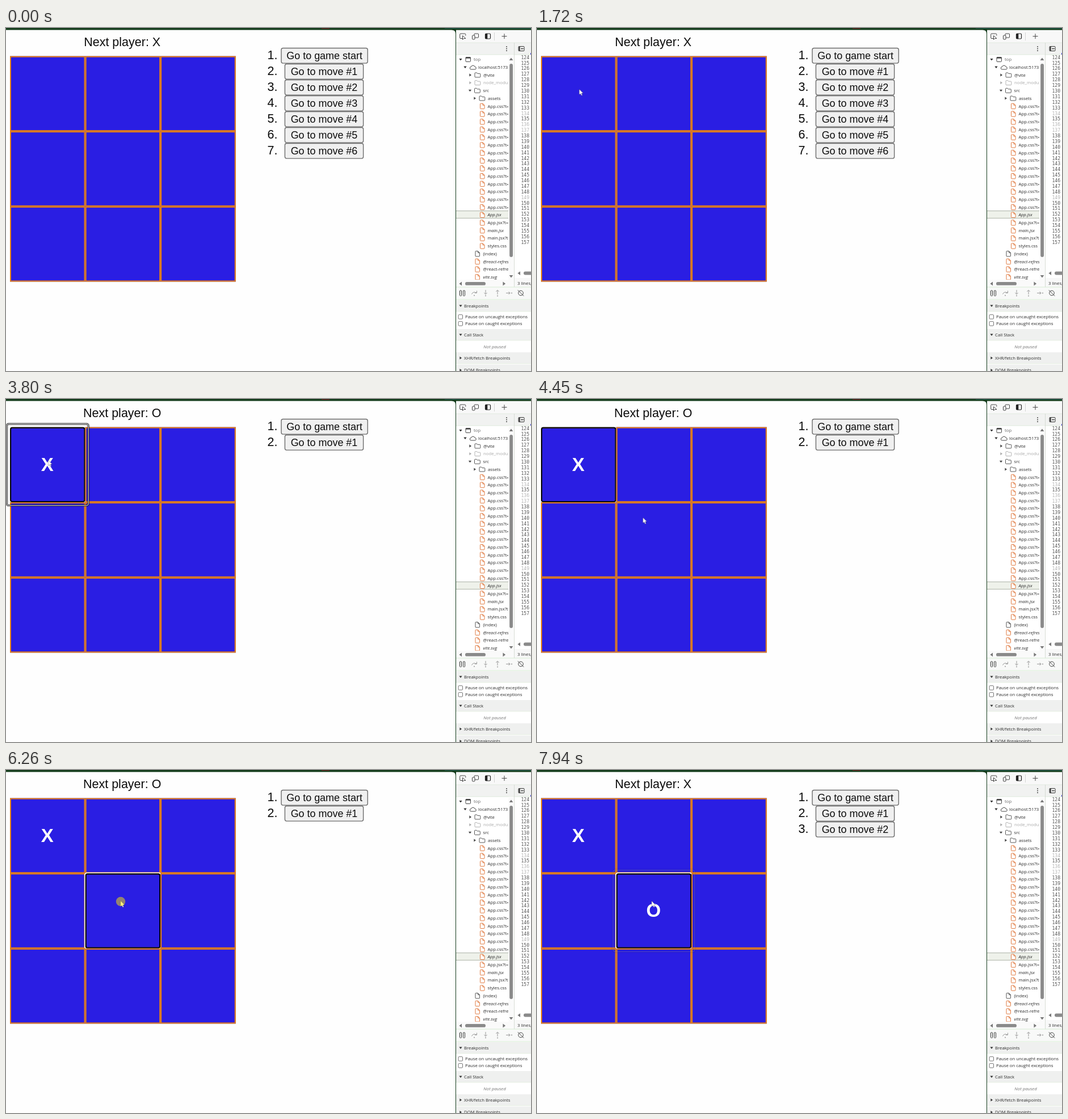
Recreate the animation shown at these times as an HTML page. Size 925 px wide and 605 px high, loop 7990 ms.

```html
<!DOCTYPE html>
<html lang="en">
<head>
<meta charset="utf-8">
<title>Tic-tac-toe</title>
<style>
html, body { margin: 0; width: 100%; height: 100%; overflow: hidden; background: #153d1d; }
svg { display: block; width: 925px; height: 605px; }
.page { font-family: "Liberation Sans", Arial, sans-serif; fill: #0c0c0c; }
.panel { font: 7.75px "Open Sans", "Noto Sans", sans-serif; fill: #2b2b2b; }
.gutter { font: 8px "DejaVu Sans Mono", monospace; }
.mid { text-anchor: middle; }
.end { text-anchor: end; }
.mark { font-size: 33px; font-weight: bold; fill: #fff; text-anchor: middle; }
.line { fill: none; stroke: #444; stroke-width: 1; }

.anim { animation: 7990ms step-end infinite; }
.turnX { animation-name: turnX; }
.turnO { animation-name: turnO; }
.start { animation-name: start; }
.markX { animation-name: markX; }
.markO { animation-name: markO; }
.focusX { animation-name: focusX; }
.focusO { animation-name: focusO; }
.clickX { animation-name: clickX; }
.clickO { animation-name: clickO; }
.hover { animation-name: hover; }
.shown { animation-name: shown; }
.ringX { animation-name: ringX; animation-timing-function: linear; }
.ringO { animation-name: ringO; animation-timing-function: linear; }
.move { animation-name: move; animation-timing-function: linear; }

@keyframes turnX { 0% { opacity: 1 } 32.541% { opacity: 0 } 79.85%, to { opacity: 1 } }
@keyframes turnO { 0% { opacity: 0 } 32.541% { opacity: 1 } 79.85%, to { opacity: 0 } }
@keyframes start { 0% { opacity: 1 } 32.541%, to { opacity: 0 } }
@keyframes markX { 0% { opacity: 0 } 32.541%, to { opacity: 1 } }
@keyframes markO { 0% { opacity: 0 } 79.85%, to { opacity: 1 } }
@keyframes focusX { 0% { opacity: 0 } 30.038% { opacity: 1 } 78.348%, to { opacity: 0 } }
@keyframes focusO { 0% { opacity: 0 } 78.348%, to { opacity: 1 } }
@keyframes clickX { 0% { opacity: 0 } 30.038% { opacity: .5 } 33.917%, to { opacity: 0 } }
@keyframes clickO { 0% { opacity: 0 } 78.348% { opacity: .5 } 80.601%, to { opacity: 0 } }
@keyframes hover { 0% { fill: #f0f0f0 } 9.8% { fill: #e3e3e3 } 15.6%, to { fill: #f0f0f0 } }
@keyframes shown { 0% { opacity: 0 } 6.258%, to { opacity: 1 } }
@keyframes ringX {
  0%, 32.54% { opacity: 0 }
  32.541%, 47.559% { opacity: 1 }
  54.568%, to { opacity: 0 }
}
@keyframes ringO {
  0%, 79.849% { opacity: 0 }
  79.85%, 93.242% { opacity: 1 }
  99.374%, to { opacity: .17 }
}
@keyframes move {
  0%, 6.258% { transform: translate(880px, 597px); animation-timing-function: ease-out }
  10.388% { transform: translate(560px, 200px) }
  13.642% { transform: translate(560px, 200px); animation-timing-function: ease-in-out }
  21.527%, 52% { transform: translate(74.5px, 108px); animation-timing-function: ease-in-out }
  55.695% { transform: translate(186.5px, 209px); animation-timing-function: ease-out }
  57.322%, 58.073% { transform: translate(200.5px, 220px) }
  60.5% { transform: translate(207.5px, 227px) }
  63.204%, to { transform: translate(202px, 231px) }
}
</style>
</head>
<body>
<svg id="stage" viewBox="0 0 925 605">
  <defs>
    <filter id="glow"><feGaussianBlur stdDeviation="1.2"/></filter>
    <clipPath id="tree"><rect x="793" y="47" width="92" height="397"/></clipPath>
  </defs>
</svg>
<script>
const rect = (x, y, w, h, fill, more = '') =>
  `<rect x="${x}" y="${y}" width="${w}" height="${h}" fill="${fill}" ${more}/>`;
const text = (x, y, str, more = '') => `<text x="${x}" y="${y}" ${more}>${str}</text>`;
const path = (d, more = 'class="line"') => `<path d="${d}" ${more}/>`;
const at = (x, y, body) => `<g transform="translate(${x} ${y})">${body}</g>`;
const group = (cls, body) => `<g class="${cls}">${body}</g>`;
const times = (n, fn) => Array.from({ length: n }, (_, i) => fn(i)).join('');

// Board
const SIZE = 132.6;
const cellPos = i => [7 + SIZE * (i % 3), 49.6 + SIZE * Math.floor(i / 3)];
const outline = (x, y, inset, color, width, rx, more = '') =>
  rect(x + inset, y + inset, SIZE - 2 * inset, SIZE - 2 * inset, 'none',
    `rx="${rx}" stroke="${color}" stroke-width="${width}" ${more}`);

function cell(i) {
  const [x, y] = cellPos(i);
  const name = { 0: 'X', 4: 'O' }[i];
  let out = rect(x, y, SIZE, SIZE, '#2a1ee3') + outline(x, y, 1, '#e87f12', 2, 0);
  if (name) {
    out += group(`anim focus${name}`,
      outline(x, y, -.3, '#fff', 2.4, 3) + outline(x, y, 1.1, '#080808', 2.2, 3));
    out += text(x + SIZE / 2 - .6, y + 77, name, `class="mark anim mark${name}"`);
  }
  return out;
}

function ring(i, name) {
  const [x, y] = cellPos(i);
  return group(`anim ring${name}`,
    outline(x, y, -5.6, '#000', 2.6, 3, 'opacity=".5" filter="url(#glow)"') +
    outline(x, y, -5.6, '#151515', 2.6, 3) +
    outline(x, y, -5.6, '#fff', 1, 3));
}

// Move list
function item(i) {
  const y = 35.5 + 28 * i;
  const [x, w] = i ? [491.4, 138.2] : [485, 152.2];
  const label = i ? `Go to move #${i}` : 'Go to game start';
  const cls = i < 2 ? '' : i === 2 ? 'anim turnX' : 'anim start';
  return group(cls,
    text(478.5, y + 19.5, `${i + 1}.`, 'class="end" font-size="21.5"') +
    rect(x, y, w, 26.6, '#f0f0f0', `rx="3" stroke="#6c6c6c" stroke-width="1.4" ${i === 4 ? 'class="anim hover"' : ''}`) +
    text(x + w / 2, y + 19.5, label, 'class="mid" font-size="17.95"'));
}

const title = name => text(204.7, 32.3, `Next player: ${name}`, `class="mid anim turn${name}" font-size="21.5"`);
const page = path('M0 3.6H785Q792 3.6 792 10V605H0Z', 'fill="#fefefe"') + group('page',
  title('X') + title('O') + times(9, cell) + times(7, item) + ring(0, 'X') + ring(4, 'O'));

// Developer tools
const arrow = (x, y, turn = 0, fill = '#333', s = 1) =>
  path('M-2.6 -1.6H2.6L0 2Z', `fill="${fill}" transform="translate(${x} ${y}) rotate(${turn}) scale(${s})"`);
const folder = (x, y, color) => at(x, y - 4.5,
  path('M.5 1.5q0-1 1-1h2.6l1.2 1.5h4q1 0 1 1v4.5q0 1-1 1h-7.8q-1 0-1-1z', `fill="none" stroke="${color}" stroke-width=".9"`));
const file = (x, y, color) => at(x, y - 5,
  path('M.5 1.4q0-.9.9-.9H5L8 3.5V9q0 .9-.9.9H1.4Q.5 9.9.5 9ZM5 .5V3.5H8', `fill="#fff" stroke="${color}" stroke-width=".9"`));

const files = [
  ...Array(14).fill('App.css?t=17'), '*App.jsx', 'App.jsx?t=17', '*main.jsx', 'main.jsx?t=17', 'styles.css',
  '(index)', '*@react-refresh', '@react-refresh', '*vite.svg'
];
const rowY = i => 55.5 + 13.7 * i;

function fileRow(name, i) {
  const y = rowY(i + 6), root = i > 18, italic = name[0] === '*';
  return file(root ? 826.5 : 835, y, i === 19 ? '#444' : '#dd6b2c') +
    text(root ? 840.5 : 848.5, y + 2.8, name.replace('*', ''), italic ? 'font-style="italic"' : '');
}

function dirRow(i, x, name, open, color = '#444') {
  const y = rowY(i);
  return arrow(x - 23, y, open ? 0 : -90, color) + folder(x - 15.5, y, color) +
    text(x, y + 2.8, name, color === '#444' ? '' : `fill="${color}"`);
}

const tree = `<g clip-path="url(#tree)">` +
  rect(792, 322.6, 110, 12.8, '#eef1ea', 'stroke="#a5ad9f" stroke-width=".9"') +
  arrow(801, 55.5) + rect(810, 51.5, 8.5, 8, 'none', 'rx="1" stroke="#444"') + rect(810, 51.5, 8.5, 2.2, '#444') +
  text(824, 58.3, 'top', 'fill="#666"') +
  arrow(809, 69.2) +
  path('M819.5 73a2.3 2.3 0 0 1 .2-4.6a3.2 3.2 0 0 1 6.2 0a2.3 2.3 0 0 1 .2 4.6Z') +
  text(832, 72, 'localhost:5173') +
  dirRow(2, 841, '@vite') + dirRow(3, 841, 'node_modules', false, '#aaa') +
  dirRow(4, 840.5, 'src', true) + dirRow(5, 849, 'assets') +
  files.map(fileRow).join('') + '</g>';

const faded = [134, 136, 137, 149];
const gutter = group('gutter', times(34, i => {
  const n = 124 + i;
  return text(922, 54.7 + 9.88 * i, n, `class="end" fill="${faded.includes(n) ? '#b5b5b5' : '#555'}"`);
}));

const scrollbars =
  rect(885.5, 47, 9, 397, '#fafafa') + rect(887.2, 63, 5.8, 341, '#8a8a8a', 'rx="2.9"') +
  arrow(890, 55, 180, '#777', 1.3) + arrow(890, 438, 0, '#777', 1.3) +
  rect(793, 444, 102, 13, '#fafafa') + rect(809, 448, 36, 5.8, '#8a8a8a', 'rx="2.9"') +
  arrow(801, 451, 90, '#777', 1.3) + arrow(877.5, 451, -90, '#777', 1.3) +
  rect(912, 429.6, 20, 6, '#8a8a8a', 'rx="3"') + arrow(904, 432.6, 90, '#777', 1.3);

const band = (y, h, fill) => rect(793, y, 132, h, fill);

const toolbar =
  band(4, 22, '#f8f8f8') + band(26, 21, '#f1f2f1') + band(25.6, .8, '#dde6da') + band(46.6, .8, '#d8e6d4') +
  path('M804 18.5H801Q799.7 18.5 799.7 17.2V11.3Q799.7 10 801 10H808.5Q809.8 10 809.8 11.3V13.5') +
  path('M804.5 13.5V20.5L806.5 18.5H810Z', 'fill="#fff" stroke="#444"') +
  rect(825, 10, 7.5, 7, 'none', 'rx="1" stroke="#444"') + rect(821.5, 13, 4.5, 7, '#f8f8f8', 'rx="1" stroke="#444"') +
  rect(844.5, 10, 9, 9, 'none', 'rx="1.5" stroke="#222" stroke-width="1.2"') + rect(844.5, 10, 3.8, 9, '#222') +
  rect(860, 8, .8, 14, '#ccc') + path('M873.5 14.6H882.5M878 10.1V19.1') +
  times(3, i => `<circle cx="882" cy="${33 + 3.5 * i}" r=".9" fill="#333"/>`) +
  rect(903, 32.5, 10, 8, 'none', 'rx="1" stroke="#333"') + rect(903, 32.5, 3, 8, '#555') +
  path('M912 36.5H908M909.5 34.8L907.8 36.5L909.5 38.2') +
  rect(924, 44, 1, 3, '#3c3cd0');

const dot = (x, y) => `<circle cx="${x}" cy="${y}" r="1" fill="#999"/>`;
const debug =
  band(457, 22, '#f8f9f8') + band(456.6, .8, '#cfe8cb') + band(478.6, .8, '#cfe8cb') +
  rect(799.5, 463, 3, 9.5, 'none', 'rx="1" stroke="#333"') + rect(805.5, 463, 3, 9.5, 'none', 'rx="1" stroke="#333"') +
  path('M820.5 469.5Q823 464 829 467M829.5 463.5V467.3H825.8' +
    'M845 462V469.5M842.3 467L845 469.7L847.7 467' +
    'M866 470V462.5M863.3 465L866 462.3L868.7 465' +
    'M881 467.5H888M885.5 465L888 467.5L885.5 470', 'fill="none" stroke="#999"') +
  dot(825, 471.8) + dot(845, 472.3) + dot(866, 472.6) + dot(891, 467.5) +
  '<circle cx="907" cy="467.5" r="4.3" class="line"/>' + path('M901.8 462.3L912.2 472.7');

const header = (y, name, open) =>
  band(y - 10, 20, '#eff0ef') + band(y + 9.6, .7, '#dcebd8') +
  arrow(801, y, open ? 0 : -90) + text(807, y + 2.8, name);
const check = (y, name) =>
  rect(797, y - 3.8, 7.5, 7.5, '#fff', 'rx="1.2" stroke="#666" stroke-width=".9"') + text(809, y + 2.8, name);

const panel = band(3.6, 602, '#fff') + group('panel',
  toolbar + tree + scrollbars + rect(895, 26, .9, 431, '#d3d9d0') + gutter +
  rect(896, 441, 29, 16, '#f8f8f8') + text(901, 452.5, '3 lines, 41 characters') +
  debug + header(490, 'Breakpoints', true) +
  check(509.5, 'Pause on uncaught exceptions') + check(521.5, 'Pause on caught exceptions') +
  header(541, 'Call Stack', true) + text(861, 564.5, 'Not paused', 'class="mid" font-style="italic" fill="#777"') +
  header(582, 'XHR/fetch Breakpoints') + header(603.5, 'DOM Breakpoints'));

// Pointer
const pointer = group('anim shown', group('anim move',
  path('M0 0V9.6L2.2 7.7L3.8 11.2L5.4 10.5L3.9 7.1H6.8Z', 'fill="#fff" stroke="#111" stroke-width=".4" stroke-opacity=".7"')));
const click = (x, y, name) => `<circle cx="${x}" cy="${y}" r="8.2" fill="#ffeb00" class="anim click${name}"/>`;

document.getElementById('stage').innerHTML +=
  rect(0, 0, 925, 605, '#153d1d') + rect(556, 0, 14, 1.2, '#6b2020') + rect(773, 0, 152, 1, '#1f5a50') +
  page + panel + pointer + click(75, 109, 'X') + click(202, 232, 'O');
</script>
</body>
</html>
```
